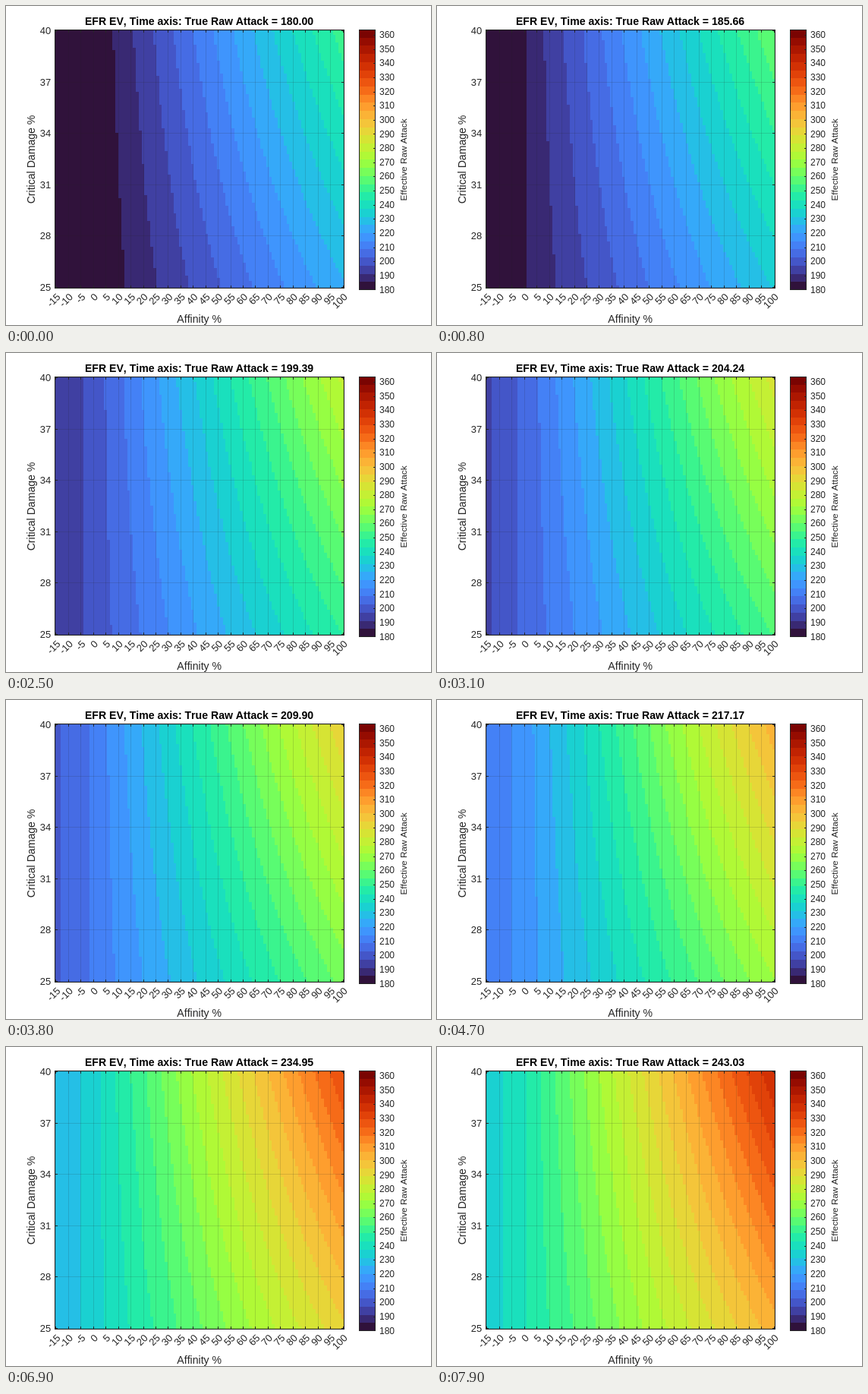
An HTML page with a canvas that plays this animation: 560 by 420 pixels, repeating every 8 s.

```html
<!DOCTYPE html>
<html lang="en">
<head>
<meta charset="utf-8">
<title>Effective Raw Attack</title>
<style>
  html, body { margin: 0; width: 100%; height: 100%; overflow: hidden; background: #fff; }
  canvas { display: block; }
</style>
</head>
<body>
<canvas id="stage" width="560" height="420"></canvas>
<script>
const ctx = document.getElementById('stage').getContext('2d');
const FONT = '"Liberation Sans", Arial, sans-serif';
const INK = '#262626', GRID = 'rgba(38,38,38,0.15)';
const LOOP = 8000, STEP = 100;

const N = 100;                                  // cells per side
const plot = { x: 64.05, y: 31, w: 381.9, h: 340.8 };
const bar = { x: 465, y: 31, w: 22, h: 343 };
const AFF = [-15, 100], CRIT = [25, 40], RAW = [180, 260];
const LOW = 180, HIGH = 364, LEVELS = 32;

const lerp = ([a, b], t) => a + (b - a) * t;
const cellX = k => Math.round(plot.x + plot.w * k / N);
const cellY = j => Math.round(plot.y + plot.h * (1 - j / N));
// Axis limits sit half a cell outside the first and last sample.
const posX = a => plot.x + plot.w * ((a - AFF[0]) / (AFF[1] - AFF[0]) * (N - 1) + 0.5) / N;
const posY = c => plot.y + plot.h * (1 - ((c - CRIT[0]) / (CRIT[1] - CRIT[0]) * (N - 1) + 0.5) / N);
const barY = v => bar.y + bar.h * (1 - (v - LOW) / (HIGH - LOW));

// Rainbow palette: smooth curve through evenly spaced colours.
const stops = ('30123b 4145ab 4675ed 39a2fc 1bcfd4 24eca6 61fc6c a4fc3b ' +
  'd1e834 f3c63a fe9b2d f36315 d93806 b11901 7a0402').split(' ')
  .map(h => [0, 2, 4].map(i => parseInt(h.substr(i, 2), 16)));
const beyond = (a, b, c) => a.map((v, i) => 3 * v - 3 * b[i] + c[i]);

function paletteColor(t) {
  const last = stops.length - 1;
  const i = Math.min(last - 1, Math.floor(t * last));
  const u = t * last - i;
  const b = stops[i], c = stops[i + 1];
  const a = stops[i - 1] || beyond(b, c, stops[i + 2]);
  const d = stops[i + 2] || beyond(c, b, a);
  const rgb = b.map((v, n) => Math.round(v + 0.5 * u * (c[n] - a[n] +
    u * (2 * a[n] - 5 * v + 4 * c[n] - d[n] + u * (3 * (v - c[n]) + d[n] - a[n])))));
  return `rgb(${rgb})`;
}
const palette = Array.from({ length: LEVELS }, (_, i) => paletteColor(i / (LEVELS - 1)));

function level(raw, aff, crit) {
  const bonus = aff < 0 ? 25 : crit;
  const value = raw * (1 + aff * bonus / 10000);
  const i = Math.floor((value - LOW) / (HIGH - LOW) * LEVELS);
  return Math.max(0, Math.min(LEVELS - 1, i));
}

function rect(x, y, w, h, color) {
  ctx.fillStyle = color;
  ctx.fillRect(x, y, w, h);
}

function frame(x0, y0, x1, y1) {
  ctx.strokeStyle = INK;
  ctx.lineWidth = 1;
  ctx.strokeRect(x0 + 0.5, y0 + 0.5, x1 - x0, y1 - y0);
}

// Text centred vertically on y by its capital height; level text sits on whole pixels.
function label(str, x, y, size, align = 'center', angle = 0, weight = '', color = INK) {
  const drop = size * 0.36;
  ctx.save();
  ctx.translate(x, angle ? y : Math.round(y + drop) - drop);
  ctx.rotate(angle);
  ctx.font = `${weight} ${size}px ${FONT}`;
  ctx.fontKerning = 'none';
  ctx.textAlign = align;
  ctx.fillStyle = color;
  ctx.fillText(str, 0, drop);
  ctx.restore();
}

function drawMap(raw) {
  for (let j = 0; j < N; j++) {
    const crit = lerp(CRIT, j / (N - 1));
    const top = cellY(j + 1), h = cellY(j) - top;
    let start = 0, current = level(raw, AFF[0], crit);
    for (let k = 1; k <= N; k++) {
      const next = k < N ? level(raw, lerp(AFF, k / (N - 1)), crit) : -1;
      if (next === current) continue;
      rect(cellX(start), top, cellX(k) - cellX(start), h, palette[current]);
      start = k;
      current = next;
    }
  }
}

function drawAxes() {
  const L = 64, T = 31, R = 445, B = 371, tick = 3;
  // Clear cell overhang beyond the frame.
  rect(R + 1, T, 4, B - T + 4, '#fff');
  rect(L, B + 1, R - L + 1, 4, '#fff');
  for (let a = AFF[0]; a <= AFF[1]; a += 5) {
    const x = Math.floor(posX(a));
    rect(x, T, 1, B - T, GRID);
    rect(x, T + 1, 1, tick, INK);
    rect(x, B - tick, 1, tick, INK);
    label(a, posX(a) + 3.2, 380.5, 13, 'right', -Math.PI / 4);
  }
  for (let c = CRIT[0]; c <= CRIT[1]; c += 3) {
    const y = Math.floor(posY(c));
    rect(L, y, R - L, 1, GRID);
    rect(L + 1, y, tick, 1, INK);
    rect(R - tick, y, tick, 1, INK);
    label(c, 59.3, posY(c), 13, 'right');
  }
  frame(L, T, R, B);
  label('Affinity %', 254.7, 412, 14.1);
  label('Critical Damage %', 33.2, 202, 14.1, 'center', -Math.PI / 2);
}

function drawBar() {
  const bottom = bar.y + bar.h;
  const edge = i => bottom - Math.round(bar.h * i / LEVELS);
  for (let i = 0; i < LEVELS; i++) {
    rect(bar.x, edge(i + 1), bar.w, edge(i) - edge(i + 1), palette[i]);
  }
  for (let v = LOW; v <= HIGH; v += 10) {
    const y = Math.min(bottom - 1, Math.floor(barY(v)));
    rect(bar.x + bar.w - 3, y, 2, 1, INK);
    label(v, 492, barY(v) - 0.7, 12, 'left');
  }
  frame(bar.x, bar.y, bar.x + bar.w - 1, bottom - 1);
  label('Effective Raw Attack', 524, 202.5, 11.8, 'center', -Math.PI / 2);
}

function draw(index) {
  const raw = lerp(RAW, index / 99);
  rect(0, 0, 560, 420, '#fff');
  drawMap(raw);
  drawAxes();
  drawBar();
  label(`EFR EV, Time axis: True Raw Attack = ${raw.toFixed(2)}`,
    254.5, 20, 14.1, 'center', 0, 'bold', '#000');
}

let shown = -1;
const began = performance.now();
function tick() {
  const n = Math.floor((performance.now() - began) % LOOP / STEP);
  const index = n < 2 ? n : n - 1;              // the second value holds twice as long
  if (index !== shown) draw(shown = index);
  requestAnimationFrame(tick);
}
tick();
</script>
</body>
</html>
```
